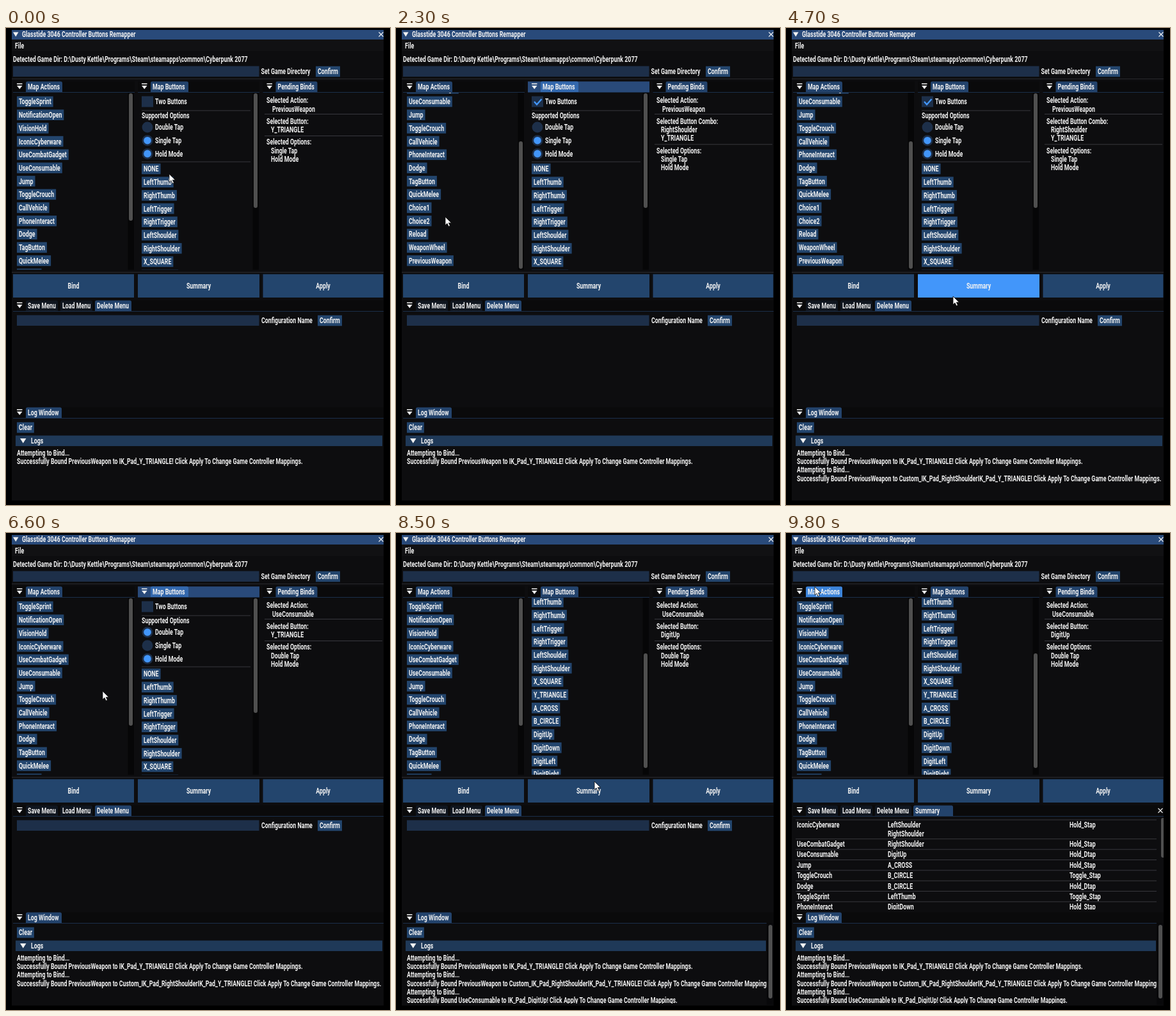
These frames come from a looping animation (600x745 px, 9.9 s). An HTML page:

```html
<!DOCTYPE html>
<html lang="en">
<head>
<meta charset="utf-8">
<title>Controller Buttons Remapper</title>
<style>
html, body { margin: 0; width: 100%; height: 100%; overflow: hidden; background: #000; }
#stage { display: block; width: 600px; height: 745px; }
text { font: 600 13px Roboto, "Open Sans", sans-serif; fill: #f2f2f2; white-space: pre; }
</style>
</head>
<body>
<svg id="stage" viewBox="0 0 600 745"></svg>
<script>
const LOOP = 9900, STEP = 100, PITCH = 20.7;
const CONDENSE = 0.68; // one ratio for the whole narrow typeface
const C = {
  win: '#0d0d0f', bar: '#0a0a0b', menu: '#111113', title: '#294a7a', frame: '#1d2f49',
  btn: '#23456d', hot: '#4296fa', tab: '#23436c', tabOn: '#3368ad', tabHot: '#3c84da',
  tabOff: '#10161f', head: '#1f3958', line: '#38383e', grip: '#4f4f4f', text: '#f2f2f2'
};
const ACTIONS = ['ToggleSprint', 'NotificationOpen', 'VisionHold', 'IconicCyberware',
  'UseCombatGadget', 'UseConsumable', 'Jump', 'ToggleCrouch', 'CallVehicle', 'PhoneInteract',
  'Dodge', 'TagButton', 'QuickMelee', 'Choice1', 'Choice2', 'Reload', 'WeaponWheel', 'PreviousWeapon'];
const BUTTONS = ['NONE', 'LeftThumb', 'RightThumb', 'LeftTrigger', 'RightTrigger', 'LeftShoulder',
  'RightShoulder', 'X_SQUARE', 'Y_TRIANGLE', 'A_CROSS', 'B_CIRCLE', 'DigitUp', 'DigitDown',
  'DigitLeft', 'DigitRight'];
const BOUND = [
  ['PreviousWeapon', 'IK_Pad_Y_TRIANGLE'],
  ['PreviousWeapon', 'Custom_IK_Pad_RightShoulderIK_Pad_Y_TRIANGLE'],
  ['UseConsumable', 'IK_Pad_DigitUp']
];
const SUMMARY = [
  ['UseCombatGadget', 'RightShoulder', 'Hold_Stap'], ['UseConsumable', 'DigitUp', 'Hold_Dtap'],
  ['Jump', 'A_CROSS', 'Hold_Stap'], ['ToggleCrouch', 'B_CIRCLE', 'Toggle_Stap'],
  ['Dodge', 'B_CIRCLE', 'Hold_Dtap'], ['ToggleSprint', 'LeftThumb', 'Toggle_Stap'],
  ['PhoneInteract', 'DigitDown', 'Hold_Stap']
];

// Timeline
const PATH = [
  [0, 255, 228], [100, 254, 226], [500, 220, 116], [700, 220, 116], [1100, 245, 345],
  [1300, 245, 345], [1700, 95, 290], [2300, 77, 295], [2500, 80, 294], [2900, 240, 270],
  [3500, 242, 252], [3700, 244, 254], [3800, 250, 268], [3900, 251, 265], [4100, 245, 212],
  [4200, 240, 214], [4400, 120, 403], [4500, 120, 403], [4600, 230, 410], [4700, 261, 419],
  [4900, 230, 405], [5200, 70, 260], [5500, 52, 219], [5600, 52, 219], [5800, 220, 116],
  [5900, 220, 116], [6200, 221, 155], [6400, 221, 156], [6600, 151, 247], [7000, 90, 240],
  [7300, 235, 290], [7700, 232, 315], [7900, 232, 315], [8200, 110, 403], [8300, 110, 403],
  [8400, 260, 381], [8500, 310, 388], [8600, 310, 398], [9000, 305, 410], [9700, 52, 90],
  [9800, 45, 84]
];
const ACTION_SCROLL = [[1600, 0], [2000, 103.5], [5000, 103.5], [5400, 0]];
const BUTTON_SCROLL = [[3000, 0], [3300, 133], [4100, 133], [4300, 0], [7300, 0], [7600, 133]];
const EVENTS = [
  [0, { two: false, action: 'PreviousWeapon', keys: ['Y_TRIANGLE'], double: false, logs: 1, focus: '', summary: false }],
  [600, { two: true, focus: 'buttons' }],
  [1200, { keys: ['RightShoulder', 'Y_TRIANGLE'] }],
  [3600, { keys: ['Y_TRIANGLE', 'RightShoulder'] }],
  [4100, { keys: ['RightShoulder', 'Y_TRIANGLE'] }],
  [4500, { logs: 2, focus: '' }],
  [5600, { action: 'UseConsumable', focus: 'actions' }],
  [5900, { two: false, keys: ['Y_TRIANGLE'], focus: 'buttons' }],
  [6300, { double: true }],
  [7800, { keys: ['DigitUp'] }],
  [8300, { logs: 3, focus: '' }],
  [8700, { summary: true }]
];

// Drawing helpers
const stage = document.getElementById('stage');
function el(tag, attrs, parent = stage) {
  const node = document.createElementNS('http://www.w3.org/2000/svg', tag);
  for (const k in attrs) node.setAttribute(k, attrs[k]);
  return parent.appendChild(node);
}
const group = parent => el('g', {}, parent);
const rect = (x, y, width, height, fill, parent, rx = 0) =>
  el('rect', { x, y, width, height, fill, rx }, parent);
const shape = (d, parent, fill = C.text) => el('path', { d, fill }, parent);
const rule = (x1, x2, y, parent, color = C.line) => rect(x1, y, x2 - x1, 1, color, parent);
const show = (node, on) => node.setAttribute('display', on ? 'inline' : 'none');
const paint = (node, color) => node.setAttribute('fill', color);
const pane = (x, y, width, height, parent) =>
  el('svg', { x, y, width, height, viewBox: [x, y, width, height].join(' ') }, parent);
function label(str, x, cy, parent, anchor = 'start') {
  const node = el('text', {
    transform: `translate(${x} ${cy + 4.4}) scale(${CONDENSE} 1)`, 'text-anchor': anchor
  }, parent);
  node.textContent = str;
  return node;
}
const textWidth = node => node.getComputedTextLength() * CONDENSE;
const cross = (x, y, parent) => el('path', {
  d: `M${x - 3.5} ${y - 3.5}l7 7m0-7l-7 7`, stroke: C.text, 'stroke-width': 1.1
}, parent);

const hits = [];
function hit(box, x, y, w, h, idle, hot, list) {
  hits.push({ box, x, y, w, h, idle, hot, list });
}
function button(str, x, cy, parent, list) {
  const box = rect(x, cy - 8.3, 0, 16.6, C.btn, parent);
  const w = textWidth(label(str, x + 3, cy, parent)) + 6;
  box.setAttribute('width', w);
  hit(box, x, cy - 8.3, w, 16.6, C.btn, C.hot, list);
}
function bigButton(str, x, w) {
  const box = rect(x, 384.5, w, 36.5, C.btn);
  label(str, x + w / 2, 403, stage, 'middle');
  hit(box, x, 384.5, w, 36.5, C.btn, C.hot);
}
function dockBar(x, w, cy) {
  const bar = rect(x, cy - 8, w, 16.5, C.bar);
  rule(x, x + w, cy + 8.5, stage, '#1b2f4a');
  rect(x + 6, cy - 5, 8.5, 1.5, C.text);
  shape(`M${x + 6} ${cy - 1.5}h8.5l-4.25 5.5z`);
  return bar;
}
function tab(str, x, cy, w, fill, parent) {
  const d = `M${x} ${cy + 8.5}v-14q0-2.5 2.5-2.5h${w - 5}q2.5 0 2.5 2.5v14z`;
  const box = shape(d, parent, fill);
  label(str, x + 3, cy, parent);
  return box;
}
const scroller = (x, y, h, parent) => rect(x, y, 6, h, C.grip, parent, 3);

// Window frame
rect(9, 3, 581, 735, C.win);
rect(9, 3, 581, 15, C.title);
shape('M11 6.5h8.5l-4.25 7z');
label('Glasstide 3046 Controller Buttons Remapper', 25, 10);
cross(586, 10);
rect(9, 18, 581, 18, C.menu);
label('File', 14, 28);
label('Detected Game Dir: D:\\Dusty Kettle\\Programs\\Steam\\steamapps\\common\\Cyberpunk 2077', 11, 49);
rect(11, 59.5, 384.5, 16.5, C.frame);
label('Set Game Directory', 398.5, 68);
button('Confirm', 484, 68);
rule(9, 590, 79, stage, '#29292d');

// Upper docks
const docks = {};
[['actions', 'Map Actions', 11, 190, 31, 57], ['buttons', 'Map Buttons', 206, 190, 226, 59],
  ['pending', 'Pending Binds', 401.5, 188.5, 421.5, 65]].forEach(([id, str, x, w, tx, tw]) => {
  const bar = dockBar(x, w, 91.5);
  docks[id] = { bar, tab: tab(str, tx, 91.5, tw, C.tab), x: tx, w: tw };
});

const actionPane = pane(11, 101, 180, 276.5);
const actionList = group(actionPane);
ACTIONS.forEach((s, i) => button(s, 17, 115 + PITCH * i, actionList, 'actions'));
rect(190.5, 101, 9.5, 276.5, '#060607');
const actionGrip = scroller(192, 102, 199);

const buttonPane = pane(206, 101, 180, 276.5);
const buttonList = group(buttonPane);
rect(212, 106.5, 18, 17, C.frame, buttonList);
const tick = el('path', {
  d: 'M216 115l4 4.5l7.5-8.5', fill: 'none', stroke: C.hot, 'stroke-width': 2.3
}, buttonList);
label('Two Buttons', 233, 115, buttonList);
rule(212, 382, 128.5, buttonList);
label('Supported Options', 212, 136.5, buttonList);
const dots = ['Double Tap', 'Single Tap', 'Hold Mode'].map((s, i) => {
  const cy = 155 + PITCH * i;
  el('circle', { cx: 221, cy, r: 8.5, fill: C.frame }, buttonList);
  label(s, 233, cy, buttonList);
  return el('circle', { cx: 221, cy, r: 5.8, fill: C.hot }, buttonList);
});
rule(212, 382, 208.5, buttonList);
BUTTONS.forEach((s, i) => button(s, 212, 220 + PITCH * i, buttonList, 'buttons'));
rect(385.5, 101, 9.5, 276.5, '#060607');
const buttonGrip = scroller(387, 102, 179);
const pending = group();

rule(9, 590, 381, stage, '#2b2b30');
bigButton('Bind', 11, 189);
bigButton('Summary', 206, 190);
bigButton('Apply', 401.5, 188);

// Lower dock
dockBar(11, 579, 433.5);
tab('Save Menu', 31, 433.5, 50, C.tabOff);
tab('Load Menu', 85, 433.5, 50, C.tabOff);
const deleteTab = tab('Delete Menu', 139, 433.5, 57, C.tab);
const configForm = group();
rect(17, 448.5, 378.5, 16.5, C.frame, configForm);
label('Configuration Name', 399, 457, configForm);
button('Confirm', 487, 457, configForm);

const summary = group();
tab('Summary', 199, 433.5, 62, C.tab, summary);
cross(585, 433.5, summary);
const table = pane(11, 444, 579, 144, summary);
const row = (cells, cy) => cells.forEach((s, i) => label(s, [17, 159, 443][i], cy, table));
rule(15, 579, 447.5, table);
row(['IconicCyberware', 'LeftShoulder', 'Hold_Stap'], 456);
label('RightShoulder', 159, 469.5, table);
SUMMARY.forEach((cells, i) => {
  rule(15, 579, 477.3 + 16.35 * i, table);
  row(cells, 485.7 + 16.35 * i);
});
scroller(586, 445, 62, table);

// Log dock
dockBar(11, 579, 600.5);
tab('Log Window', 31, 600.5, 56, C.tab);
button('Clear', 17, 624);
const logHead = rect(15, 636.5, 573, 16.5, C.head);
shape('M22 641h9.5l-4.75 7.5z');
label('Logs', 39, 645);
const logPane = pane(11, 654, 577, 81);
const logGroups = BOUND.map(([action, key], i) => {
  const g = group(logPane), y = 663.3 + 26.6 * i;
  label('Attempting to Bind...', 17, y, g);
  label(`Successfully Bound ${action} to ${key}! Click Apply To Change Game Controller Mappings.`,
    17, y + 13.3, g);
  return g;
});
const logGrip = group();
rect(579, 609, 11, 128, '#08080a', logGrip);
scroller(582, 612, 115, logGrip);

const cursor = el('path', {
  d: 'M0 0v13l3-2.7l2.2 4.7l2.2-1l-2.1-4.6h4.2z',
  fill: '#fff', stroke: '#111', 'stroke-width': 0.8
});

// Motion
function sample(keys, t, ease = k => k) {
  let i = keys.findIndex(k => k[0] > t);
  if (i < 0) i = keys.length;
  if (i === 0) return keys[0].slice(1);
  const a = keys[i - 1], b = keys[i] || a;
  const k = b === a ? 0 : ease((t - a[0]) / (b[0] - a[0]));
  return a.slice(1).map((v, n) => v + (b[n + 1] - v) * k);
}
const smooth = k => k * k * (3 - 2 * k);
const stateAt = t => Object.assign({}, ...EVENTS.filter(e => e[0] <= t).map(e => e[1]));
const inside = (px, py, x, y, w, h) => px >= x && px <= x + w && py >= y && py <= y + h;

function drawPending(s) {
  pending.replaceChildren();
  let y = 158.7;
  label('Selected Action:', 407, 113, pending);
  label(s.action, 416, 126.3, pending);
  rule(404, 588, 134, pending);
  label(s.two ? 'Selected Button Combo:' : 'Selected Button:', 407, 145.5, pending);
  s.keys.forEach(k => { label(k, 414, y, pending); y += 13.3; });
  rule(404, 588, y - 4, pending);
  label('Selected Options:', 407, y + 6, pending);
  label(s.double ? 'Double Tap' : 'Single Tap', 414, y + 19.2, pending);
  label('Hold Mode', 414, y + 32.5, pending);
}

function render(t) {
  const s = stateAt(t);
  const scroll = { actions: sample(ACTION_SCROLL, t)[0], buttons: sample(BUTTON_SCROLL, t)[0] };
  const [x, y] = sample(PATH, t, smooth);
  // Highlights trail the pointer by one step
  const [hx, hy] = sample(PATH, Math.max(0, t - STEP), smooth);

  cursor.setAttribute('transform', `translate(${x} ${y})`);
  actionList.setAttribute('transform', `translate(0 ${-scroll.actions})`);
  buttonList.setAttribute('transform', `translate(0 ${-scroll.buttons})`);
  actionGrip.setAttribute('y', 102 + scroll.actions * 75 / 103.5);
  buttonGrip.setAttribute('y', 102 + scroll.buttons * 86 / 133);

  for (const h of hits) {
    const off = h.list ? scroll[h.list] : 0;
    const open = !h.list || (hy > 101 && hy < 377);
    paint(h.box, open && inside(hx, hy, h.x, h.y - off, h.w, h.h) ? h.hot : h.idle);
  }
  for (const id in docks) {
    const d = docks[id], on = s.focus === id;
    paint(d.bar, on ? C.title : C.bar);
    paint(d.tab, inside(hx, hy, d.x, 83.5, d.w, 16) ? C.tabHot : on ? C.tabOn : C.tab);
  }
  show(tick, s.two);
  show(dots[0], s.double);
  show(dots[1], !s.double);
  drawPending(s);

  show(configForm, !s.summary);
  show(summary, s.summary);
  paint(deleteTab, s.summary ? C.tabOff : C.tab);

  const full = s.logs > 2;
  logGroups.forEach((g, i) => show(g, i < s.logs));
  show(logGrip, full);
  logHead.setAttribute('width', full ? 563 : 573);
}

const start = performance.now();
let last = -1;
function play() {
  const t = Math.floor(((performance.now() - start) % LOOP) / STEP) * STEP;
  if (t !== last) render(last = t);
  requestAnimationFrame(play);
}
play();
</script>
</body>
</html>
```
